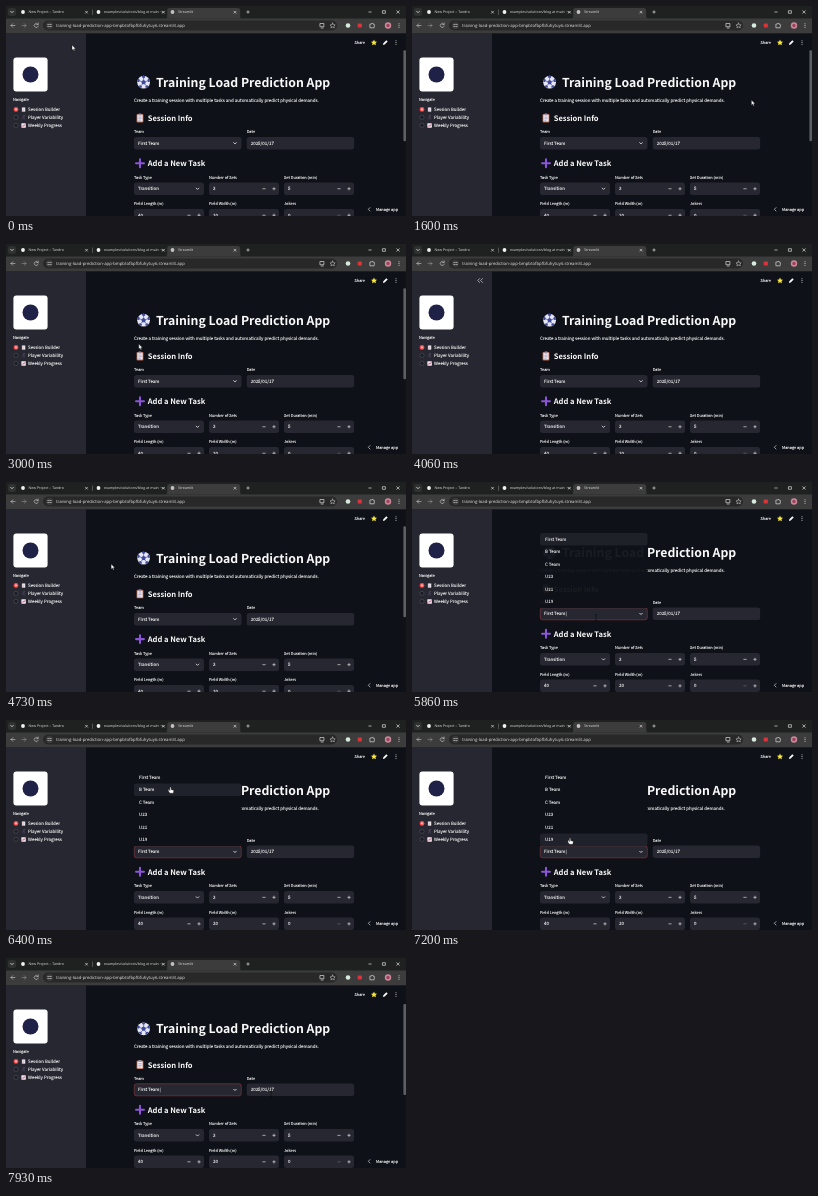
An HTML page that plays this animation: 400 px wide and 210 px high, repeating every 8 s.

```html
<!DOCTYPE html>
<html lang="en">
<head>
<meta charset="utf-8">
<title>Training Load Prediction App</title>
<style>
html, body { margin: 0; width: 100%; height: 100%; overflow: hidden; background: #0e1117; }
svg { display: block; width: 400px; height: 210px; }
text { fill: #fafafa; stroke: #fafafa; stroke-width: .1; font-family: "Noto Sans CJK JP", "Noto Sans CJK SC", "Noto Sans CJK", "Noto Sans", sans-serif; text-rendering: geometricPrecision; white-space: pre; }
.ui { font-family: "Open Sans", "Noto Sans", sans-serif; fill: #e3e3e3; stroke: none; }
.line { fill: none; stroke: #d8d8d8; stroke-width: .7; stroke-linecap: round; stroke-linejoin: round; }
</style>
</head>
<body>
<svg id="stage" viewBox="0 0 400 210"></svg>
<script>
const LOOP = 8000;
const stage = document.getElementById('stage');

const rect = (x, y, w, h, fill, r = 0, extra = '') =>
  `<rect x="${x}" y="${y}" width="${w}" height="${h}" rx="${r}" fill="${fill}" ${extra}/>`;
const dot = (x, y, r, fill, extra = '') => `<circle cx="${x}" cy="${y}" r="${r}" fill="${fill}" ${extra}/>`;
const line = (d, extra = '') => `<path class="line" d="${d}" ${extra}/>`;
// Text is placed by the middle of its capitals.
const text = (x, y, size, s, extra = '') =>
  `<text x="${x}" y="${y + size * .36}" font-size="${size}" ${extra}>${s}</text>`;
const bold = 'font-weight="700" style="stroke:none"';
const ui = 'class="ui"';
const cross = (x, y, r = 1.3) => line(`M${x - r} ${y - r}l${2 * r} ${2 * r}m0 ${-2 * r}l${-2 * r} ${2 * r}`);
const minus = (x, y, extra) => line(`M${x - 1.2} ${y}h2.4`, extra);
const plus = (x, y) => minus(x, y) + line(`M${x} ${y - 1.2}v2.4`);
const chevron = (x, y) => line(`M${x - 1.3} ${y - .6}l1.3 1.3l1.3-1.3`, 'style="stroke-width:.9"');
const dots = (x, y) => [-1.7, 0, 1.7].map(d => dot(x, y + d, .5, '#e3e3e3')).join('');
const at = (x, y, k, body) => `<g transform="translate(${x} ${y}) scale(${k})">${body}</g>`;

// Icons, drawn about their centre in a 10-unit box
const clipboard = rect(-3.8, -4.5, 7.6, 9.4, '#b5654a', 1) + rect(-2.9, -3.5, 5.8, 7.5, '#f3eef8', .3) +
  rect(-1.7, -5, 3.4, 2.2, '#9a93a8', .6) +
  '<path d="M-1.8-1h3.6M-1.8.8h3.6M-1.8 2.6h2.4" stroke="#8c86a0" stroke-width=".7"/>';
const chart = rect(-4.5, -4.5, 9, 9, '#eeeaf4', .8) +
  '<path d="M-4.5 0h9M0-4.5v9" stroke="#b9c6da" stroke-width=".6"/>' +
  '<path d="M-3.5 3l2.4-3l2 1.4l2.8-4.6" fill="none" stroke="#d8435c" stroke-width="1.3"/>';
const runner = dot(1, -3.6, 1.3, '#6d5a62') +
  '<path d="M.5-2L-.7 1.2L2 2.4L1 4.8M-.7 1.2L-3.4 3.4M-3-.6L.3-1.6L3 .2" fill="none" stroke="#4f4560" stroke-width="1.3"/>';
const addSign = '<path d="M0-4.4V4.4M-4.4 0H4.4" stroke="#8a55d7" stroke-width="2.3" stroke-linecap="round"/>';
const spokes = [...Array(5)].map((_, i) => `<g transform="rotate(${i * 72})">
  <path d="M0-1.6V-3.4" stroke="#4a56a8" stroke-width=".5"/><path d="M-1.4-4.6Q0-5.2 1.4-4.6L.9-3.5L0-3.1L-.9-3.5Z" fill="#3f4a9a"/></g>`).join('');
const ball = dot(0, 0, 4.9, '#e6e6f4') + spokes +
  '<path d="M0-1.9L1.8-.6L1.1 1.5H-1.1L-1.8-.6Z" fill="#3f4a9a"/>';

const PAGE_TOP = 27.3;

function browser() {
  const tab = (x, color, title, close) => dot(x, 6, 1.9, color) + text(x + 5.5, 6.1, 3.6, title, ui) + cross(close, 6.2, 1);
  return rect(0, 0, 400, 13, '#1f2020') + rect(0, 12.5, 400, PAGE_TOP - 12.5, '#3c3c3c') +
    '<path d="M159 12.6q2.2 0 2.2-2.2V4.5q0-2.5 2.5-2.5h68q2.5 0 2.5 2.5v5.9q0 2.2 2.2 2.2z" fill="#3c3c3c"/>' +
    rect(2, 2, 8, 8, '#303131', 2.5) + chevron(6, 6) +
    tab(17, '#f2f2f2', 'New Project – Tandro', 80.5) + line('M86.5 4v4.5', 'opacity=".4"') +
    tab(92.5, '#f2f2f2', 'examples/solutions/blog at main · v', 157.5) +
    tab(166.5, '#c4c0c4', 'Streamlit', 229) + plus(242, 6) +
    minus(364, 6) + line('M376.8 4.7h2.6v2.6h-2.6z') + cross(392, 6) +
    line('M9 19.5H5m1.8-1.8l-1.8 1.8l1.8 1.8', 'opacity=".8"') +
    line('M16 19.5h4m-1.8-1.8l1.8 1.8l-1.8 1.8', 'opacity=".45"') +
    line('M32 18.4a2 2 0 1 0 .2 1.8M32.2 17v1.6h-1.6', 'opacity=".8"') +
    rect(37, 14.5, 294, 10, '#282828', 5) + dot(43.5, 19.5, 3.4, '#3c3c3c') +
    line('M41.8 18.5h1.3m1.1 0h1M41.8 20.5h.8m1.1 0h1.5', 'style="stroke-width:.6"') +
    text(50, 19.5, 4.28, 'training-load-prediction-app-bmpbtofbpfbfuhytuy6.streamlit.app', ui) +
    line('M314.3 17.5h3.6v3.2h-3.6zM315.2 22h2') +
    line('M326.6 17l.8 1.7l1.8.2l-1.3 1.2l.4 1.8l-1.7-.9l-1.7.9l.4-1.8l-1.3-1.2l1.8-.2z', 'style="stroke-width:.5"') +
    dot(342, 19.5, 2.3, '#d6eadd') + rect(351.7, 17.4, 4.2, 4.2, '#d8343c', .8) +
    line('M364.3 18h1.2q.7-1.8 1.4 0h1.2v1.3q1.6.6 0 1.3v1.2h-3.8z') +
    dot(382, 19.5, 3.2, '#c98a9c') + dot(382, 19.5, 1.7, '#a0405a') + dots(393, 19.5);
}

function sidebar() {
  const rows = [['Session Builder', clipboard], ['Player Variability', runner], ['Weekly Progress', chart]];
  return rect(0, PAGE_TOP, 80, 184, '#262730') + rect(7.4, 51.4, 34.2, 34.2, '#fff', 3) + dot(24.5, 68.5, 8, '#1f2147') +
    text(7, 94, 3.9, 'Navigate') +
    rows.map(([name, icon], i) => {
      const y = 103.4 + i * 8;
      const radio = i ? dot(10, y, 2.1, '#1b1d26', 'stroke="#6b6d78" stroke-width=".4"')
                      : dot(10, y, 2.4, '#ff4b4b') + dot(10, y, .9, '#fff');
      return radio + at(17.6, y, .5, icon) + text(22, y, 4.46, name);
    }).join('') +
    `<g id="fold">${line('M67.6 34.6l-1.9 1.9l1.9 1.9m2.9-3.8l-1.9 1.9l1.9 1.9')}</g>`;
}

function field(x, y, w, label, value, kind) {
  const mid = y + 6.25;
  let extra = '';
  if (kind === 'select') extra = chevron(x + w - 6.5, mid);
  if (kind === 'number') extra = minus(x + 55, mid, value === '0' ? 'opacity=".35"' : '') + plus(x + 65, mid);
  return text(x, y - 5.1, 3.9, label) + rect(x, y, w, 12.5, '#262730', 2.5) + text(x + 4, mid, 4.46, value) + extra;
}

function page() {
  return at(137.6, 76.2, 1.3, ball) + text(150, 76.4, 12.28, 'Training Load Prediction App', bold) +
    text(128, 94, 4.47, 'Create a training session with multiple tasks and automatically predict physical demands.') +
    at(134, 112, .9, clipboard) + text(141.7, 112.2, 7.55, 'Session Info', bold) +
    field(128, 131, 107.5, 'Team', 'First Team', 'select') +
    field(240.7, 131, 107.5, 'Date', '2025/01/17') +
    '<g id="focus">' + rect(128.2, 131.2, 107.1, 12.1, 'none', 2.4, 'stroke="#ff4b4b" stroke-width=".4" opacity=".7"') +
    '<path id="caret" d="M154.3 135v4.8" stroke="#fafafa" stroke-width=".4"/></g>' +
    at(134, 157.2, .9, addSign) + text(141.7, 157.4, 7.55, 'Add a New Task', bold) +
    field(128, 176.5, 70, 'Task Type', 'Transition', 'select') +
    field(203, 176.5, 70, 'Number of Sets', '3', 'number') +
    field(278, 176.5, 70, 'Set Duration (min)', '5', 'number') +
    field(128, 203, 70, 'Field Length (m)', '40', 'number') +
    field(203, 203, 70, 'Field Width (m)', '20', 'number') +
    field(278, 203, 70, 'Jokers', '0', 'number');
}

const ROW = 12.5, LIST_TOP = 51;
const teams = ['First Team', 'B Team', 'C Team', 'U23', 'U21', 'U19'];
const list = rect(128, LIST_TOP, 107.5, 75, '#0e1117', 2.5) +
  rect(128, LIST_TOP, 107.5, ROW, '#20222b', 2, 'id="hover"') +
  teams.map((name, i) => text(133, LIST_TOP + ROW * (i + .5), 4.46, name)).join('');

const header = text(348.5, 36.5, 3.9, 'Share') +
  '<path d="M368 33.6l.9 1.9l2.1.3l-1.5 1.4l.4 2.1l-1.9-1l-1.9 1l.4-2.1l-1.5-1.4l2.1-.3z" fill="#f5e642"/>' +
  '<path d="M377 38.9l.3-1.7l3-3l1.4 1.4l-3 3z" fill="#fafafa"/>' + dots(390, 36.5);
const manage = rect(356, 197, 48, 16, '#0e1117', 3) + line('M364 201.6l-1.7 1.7l1.7 1.7') + text(370, 203.4, 3.9, 'Manage app');
const scrollbar = rect(397.4, 44.2, 2.6, 91, '#5d5f66', 1, 'id="thumb"');

const pointers = `<g id="cursor">
  <path id="arrow" d="M0 0V5.2L1.2 4.1L2 6L2.9 5.6L2.1 3.8H3.7Z" fill="#fff" stroke="#000" stroke-width=".35"/>
  <path id="hand" d="M-.6.6Q0-.4.6.6V2.6L3 3.2Q3.4 3.4 3.3 4L2.8 6.3H-.6L-2.2 4.1Q-2-.0 -.6 3.7Z" fill="#fff" stroke="#000" stroke-width=".35"/>
  <path id="beam" d="M-1-2.8H1M0-2.8V2.8M-1 2.8H1" fill="none" stroke="#07080b" stroke-width=".5"/></g>`;

stage.innerHTML = rect(0, 0, 400, 210, '#0e1117') + `<g id="page">${page()}</g>` + header +
  `<g id="list">${list}</g>` + manage + scrollbar + sidebar() + browser() + pointers;

const part = {};
stage.querySelectorAll('[id]').forEach(el => part[el.id] = el);
const show = (name, on) => part[name].setAttribute('visibility', on ? 'inherit' : 'hidden');
const ramp = (t, a, b) => Math.min(1, Math.max(0, (t - a) / (b - a)));

// Pointer path: time, x, y
const path = [
  [0, 66, 39], [60, 66, 39], [330, 130, 66], [600, 130, 66], [1060, 340, 94], [1600, 340, 94],
  [1930, 139, 90], [2330, 135, 82], [2730, 135, 82], [2860, 132, 100], [3000, 132, 100], [3260, 340, 105],
  [3400, 340, 105], [3730, 4, 100], [3930, 4, 100], [4000, -8, 95], [4200, -8, 95], [4260, 60, 90], [4400, 90, 88],
  [4730, 105, 82], [4860, 125, 79], [5060, 160, 116], [5200, 175, 128], [5460, 184, 135], [5930, 184, 135.5],
  [6130, 176, 95], [6400, 164.5, 67], [6530, 164, 60], [6800, 164, 60], [7200, 158, 118], [7400, 158, 118],
  [7460, 180, 185], [7600, 180, 185], [7730, 265, 136], [LOOP, 265, 136]
];

function pointerAt(t) {
  const i = path.findIndex(p => p[0] > t);
  const [t0, x0, y0] = path[i - 1], [t1, x1, y1] = path[i];
  const k = (t - t0) / (t1 - t0);
  return [x0 + (x1 - x0) * k, y0 + (y1 - y0) * k];
}

function draw(now) {
  const t = now % LOOP;
  const [x, y] = pointerAt(t);
  const scrolled = ramp(t, 4730, 4800);
  part.page.setAttribute('transform', `translate(0 ${-5.4 * scrolled})`);
  part.thumb.setAttribute('transform', `translate(0 ${1.8 * scrolled})`);

  const open = ramp(t, 5730, 5868) * (1 - ramp(t, 7600, 7710));
  part.list.setAttribute('opacity', open);
  const row = t < 5960 ? 0 : Math.min(5, Math.max(0, Math.floor((y - LIST_TOP) / ROW)));
  part.hover.setAttribute('y', LIST_TOP + row * ROW);
  show('focus', t >= 5730);
  show('caret', t >= 5730 && (t - 5730) % 1000 < 500);

  // Hovering the sidebar shows its fold button and hides the page's scrollbar.
  const overSidebar = t >= 3660 && t < 4400;
  show('fold', overSidebar);
  show('thumb', !overSidebar && open === 0);

  const onField = t > 5000 && x > 128 && x < 348 && y > 126 && y < 139;
  const onList = open > .5 && y > LIST_TOP && y < 126;
  part.cursor.setAttribute('transform', `translate(${x} ${y})`);
  show('beam', onField);
  show('hand', onList);
  show('arrow', !onField && !onList);
  requestAnimationFrame(draw);
}
requestAnimationFrame(draw);
</script>
</body>
</html>
```
